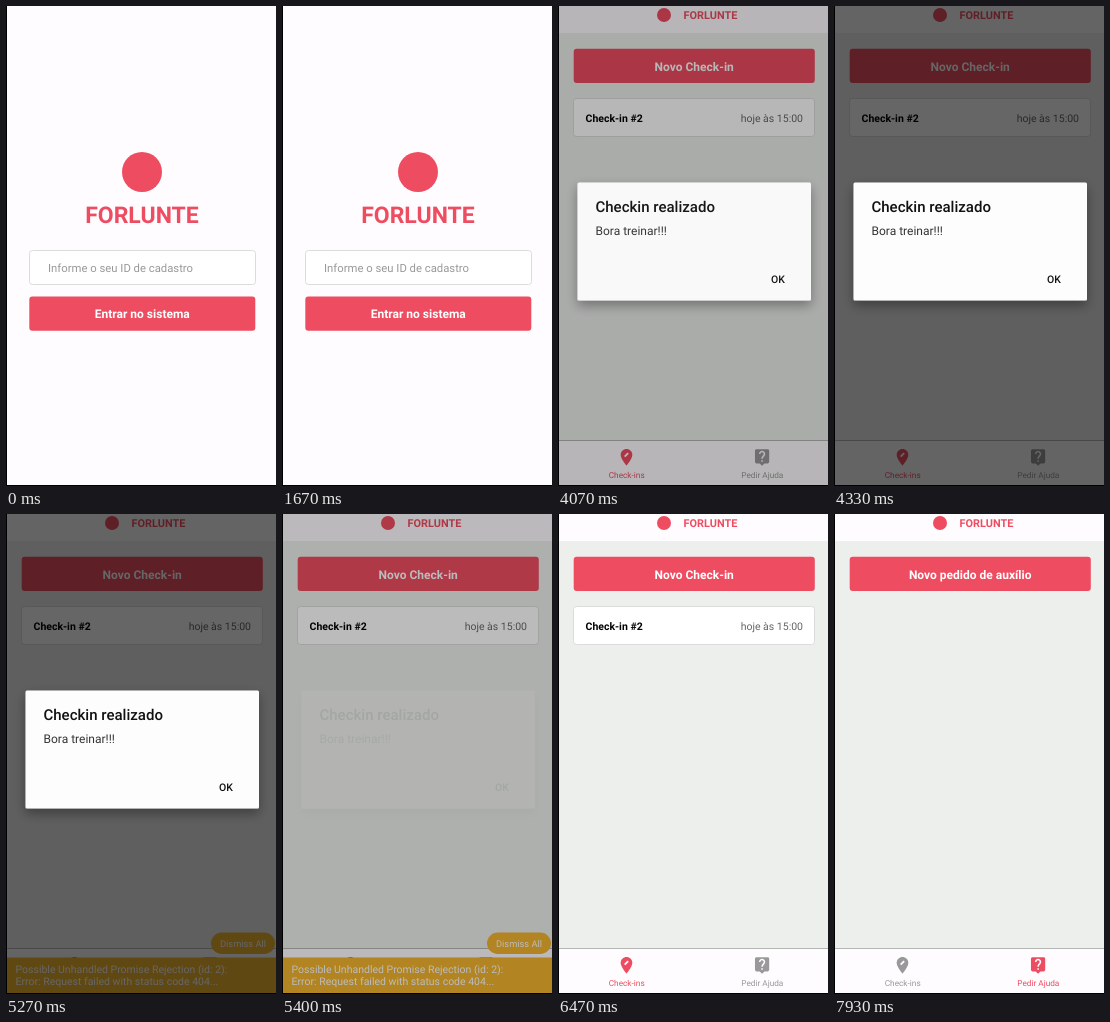
Recreate the animation shown at these times as an HTML page. Size 270 by 480 pixels, loop 8000 ms.

```html
<!DOCTYPE html>
<html lang="pt-BR">
<head>
<meta charset="utf-8">
<title>Check-in</title>
<style>
  html, body { margin: 0; width: 100%; height: 100%; overflow: hidden; background: #fefcfe; }
  svg { display: block; width: 100vw; height: 100vh; font-family: Roboto, "Noto Sans", sans-serif; text-rendering: geometricPrecision; }
  .brand { fill: #ee4d61; }
  .bold { font-weight: 700; }
  .medium { font-weight: 500; }
  .mid { text-anchor: middle; }
  .end { text-anchor: end; }
  .btn { font-weight: 700; font-size: 12px; fill: #fff; text-anchor: middle; }
  .box { fill: #fff; stroke: #dcdcdc; }
  .tab { fill: #999; font-size: 8.25px; text-anchor: middle; }
  .tab.on { fill: #ee4d61; }
  .warn { fill: #fff; font-size: 10.5px; }
</style>
</head>
<body>
<svg viewBox="0 0 270 480">
  <defs>
    <filter id="shadow" x="-20%" y="-20%" width="140%" height="150%">
      <feDropShadow dx="0" dy="5" stdDeviation="6" flood-opacity=".35"/>
    </filter>
  </defs>

  <g id="login">
    <rect width="270" height="480" fill="#fefcfe"/>
    <circle class="brand" cx="136" cy="166" r="20"/>
    <text class="brand bold mid" x="136" y="216.5" font-size="23">FORLUNTE</text>
    <rect class="box" x="23.5" y="244.5" width="226" height="34" rx="3"/>
    <text x="42" y="265.7" font-size="11.3" fill="#999">Informe o seu ID de cadastro</text>
    <rect class="brand" x="23.3" y="290.4" width="226" height="34.3" rx="3"/>
    <text class="btn" x="136.3" y="312.2">Entrar no sistema</text>
  </g>

  <g id="home">
    <rect width="270" height="480" fill="#edefec"/>
    <rect width="270" height="27" fill="#fefcfe"/>
    <circle class="brand" cx="106" cy="9" r="7"/>
    <text class="brand bold" x="125.5" y="13.3" font-size="10.9">FORLUNTE</text>
    <rect class="brand" x="15.7" y="42.7" width="241.1" height="34.2" rx="3"/>
    <text class="btn" id="action" x="136.2" y="64.7"></text>

    <g id="card" font-size="10.5">
      <rect class="box" x="15.5" y="92.5" width="241" height="38" rx="3"/>
      <text class="bold" x="27.5" y="115.7">Check-in #2</text>
      <text class="end" x="245" y="115.7" fill="#666">hoje às 15:00</text>
    </g>

    <rect y="434.5" width="270" height="45.5" fill="#fefcfe"/>
    <rect y="434" width="270" height="1" fill="#b4b6b4"/>
    <g class="tab" id="tabList">
      <g transform="translate(58.5 441.3) scale(.833)">
        <path d="M12 2C8.14 2 5 5.14 5 9c0 5.25 7 13 7 13s7-7.75 7-13c0-3.86-3.14-7-7-7z"/>
        <path d="M9.8 11.2L14 7" stroke="#fefcfe" stroke-width="2.2"/>
      </g>
      <text x="68.7" y="472.4">Check-ins</text>
    </g>
    <g class="tab" id="tabHelp">
      <g transform="translate(194.6 441.6) scale(.79)">
        <path d="M19 2H5c-1.1 0-2 .9-2 2v14c0 1.1.9 2 2 2h4l3 3 3-3h4c1.1 0 2-.9 2-2V4c0-1.1-.9-2-2-2z"/>
        <path d="M9 8a3 3 0 1 1 5.1 2.1C12.8 11.4 12 12 12 14M12 16v2" fill="none" stroke="#fefcfe" stroke-width="2"/>
      </g>
      <text x="204.3" y="472.4">Pedir Ajuda</text>
    </g>
  </g>

  <g id="warning">
    <rect x="205" y="418.5" width="64" height="21.5" rx="10.75" fill="#f2b42e"/>
    <text class="warn mid" x="237" y="432.6" style="font-size:9.3px">Dismiss All</text>
    <rect y="443.5" width="270" height="36.5" fill="#f2b42e"/>
    <text class="warn" x="9.5" y="458.5">Possible Unhandled Promise Rejection (id: 2):</text>
    <text class="warn" x="9.5" y="471.2">Error: Request failed with status code 404...</text>
  </g>

  <rect id="dim" width="270" height="480"/>

  <g id="dialog">
    <rect x="19.5" y="176.5" width="233.5" height="118" rx="1.5" fill="#fefdfe" filter="url(#shadow)"/>
    <text class="medium" x="37.5" y="206" font-size="15" fill="#111">Checkin realizado</text>
    <text x="37.5" y="229" font-size="12" fill="#333">Bora treinar!!!</text>
    <text class="medium" x="213" y="277.3" font-size="10.5" fill="#111">OK</text>
  </g>

  <!-- dark edge along the left and bottom of the screen -->
  <path d="M0 0H1V479H270V480H0z"/>
</svg>
<script>
  const LOOP = 8000;
  const ENTER = 1730, CHECKED = 3990, WARN = 4470, DISMISS = 5870, HELP = 7270;

  // [time, value] pairs, linear in between
  const dimKeys = [[3985, 0], [4070, .28], [4170, .6], [5300, .6], [5400, .27], [5470, 0]];
  const dialogKeys = [[3985, 0], [4070, .96], [4110, 1], [5300, 1], [5400, .06], [5430, 0]];

  const el = Object.fromEntries([...document.querySelectorAll('[id]')].map(e => [e.id, e]));
  const show = (e, on) => { e.style.display = on ? '' : 'none'; };

  function valueAt(keys, t) {
    if (t <= keys[0][0]) return keys[0][1];
    for (let i = 1; i < keys.length; i++) {
      const [t0, v0] = keys[i - 1], [t1, v1] = keys[i];
      if (t <= t1) return v0 + (v1 - v0) * (t - t0) / (t1 - t0);
    }
    return keys[keys.length - 1][1];
  }

  function draw(t) {
    const help = t >= HELP;
    show(el.login, t < ENTER);
    show(el.home, t >= ENTER);
    show(el.card, t >= CHECKED && !help);
    show(el.warning, t >= WARN && t < DISMISS);
    el.action.textContent = help ? 'Novo pedido de auxílio' : 'Novo Check-in';
    el.tabList.classList.toggle('on', !help);
    el.tabHelp.classList.toggle('on', help);
    el.dim.style.opacity = valueAt(dimKeys, t);
    el.dialog.style.opacity = valueAt(dialogKeys, t);
  }

  const start = performance.now();
  function tick() {
    draw((performance.now() - start) % LOOP);
    requestAnimationFrame(tick);
  }
  tick();
</script>
</body>
</html>
```
